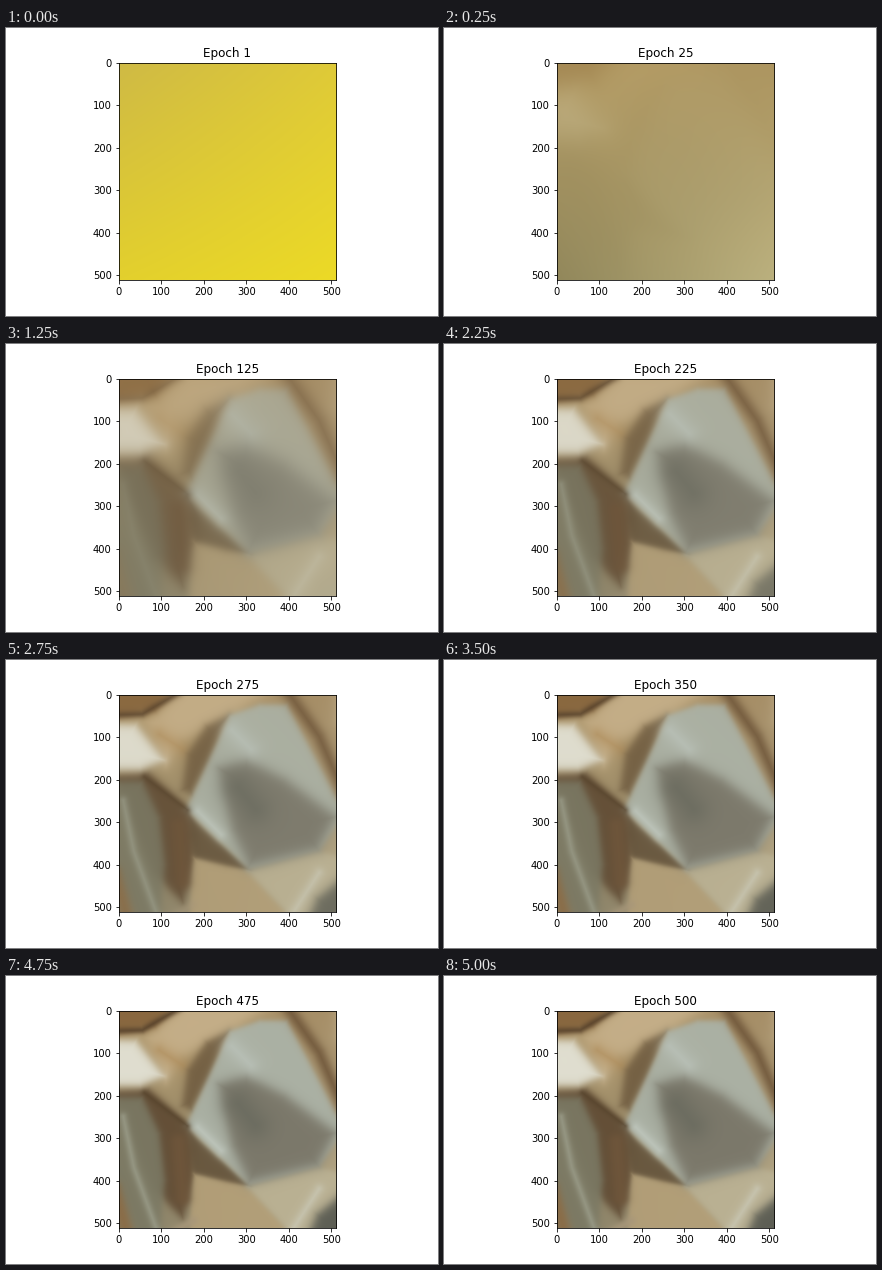
A matplotlib script for the animation above (5.25 s loop, 432x288 px).

```python
import numpy as np
import matplotlib.pyplot as plt
from matplotlib.animation import FuncAnimation
from matplotlib.colors import to_rgb

SIZE = 512
RES = 218
FRAMES = 21

axis = (np.arange(RES) + 0.5) * SIZE / RES
X, Y = np.meshgrid(axis, axis)


def rgb(code):
    return np.array(to_rgb("#" + code))


def gradient(top_left, top_right, bottom_left, bottom_right):
    u, v = X[..., None] / SIZE, Y[..., None] / SIZE
    top = rgb(top_left) * (1 - u) + rgb(top_right) * u
    bottom = rgb(bottom_left) * (1 - u) + rgb(bottom_right) * u
    return top * (1 - v) + bottom * v


def line_distance(points):
    dist = np.full(X.shape, np.inf)
    for (x0, y0), (x1, y1) in zip(points, points[1:]):
        dx, dy = x1 - x0, y1 - y0
        t = np.clip(((X - x0) * dx + (Y - y0) * dy) / (dx * dx + dy * dy), 0, 1)
        dist = np.minimum(dist, np.hypot(X - x0 - t * dx, Y - y0 - t * dy))
    return dist


def inside(points):
    mask = np.zeros(X.shape, bool)
    for (x0, y0), (x1, y1) in zip(points, points[1:]):
        if y0 != y1:
            mask ^= ((y0 > Y) != (y1 > Y)) & (X < x0 + (Y - y0) * (x1 - x0) / (y1 - y0))
    return mask


layers = []


def facet(color, soft, *points, start=20):
    """Soft-edged polygon that begins to appear at epoch start."""
    loop = points + points[:1]
    dist = line_distance(loop)
    layers.append((rgb(color), soft, start, np.where(inside(loop), -dist, dist)))


def streak(color, width, soft, *points, start=60):
    """Soft stroke along a path."""
    layers.append((rgb(color), soft, start, line_distance(points) - width))


YELLOW = gradient("cfba45", "dfca38", "e3d02d", "ecda26")
BASE = gradient("b39a6c", "a58d66", "857c62", "b3aa8c")

# Upper slope and its shadow
facet("c6b08a", 20, (65, 65), (150, -20), (370, -20), (255, 55), (150, 110), (110, 170))
streak("ae8c5a", 8, 22, (95, 95), (150, 130))
facet("715d41", 13, (258, 50), (205, 75), (160, 140), (148, 225), (172, 238), (215, 160))

# Ground
facet("5f4a33", 14, (-20, 190), (70, 185), (170, 275), (180, 330), (178, 390), (150, 490), (80, 420))
facet("65543c", 8, (160, 280), (310, 415), (250, 412), (175, 388))
facet("b39f78", 8, (176, 385), (305, 415), (410, 530), (165, 530))
facet("bbb294", 9, (300, 415), (470, 370), (530, 385), (530, 530), (410, 530))

# Large pale face
facet("abb3a8", 9, (260, 50), (330, 25), (395, 25), (530, 280), (470, 368), (305, 412), (158, 270))
facet("787466", 20, (235, 175), (300, 155), (390, 200), (510, 288), (468, 366), (305, 405), (265, 320))
streak("696a5e", 25, 38, (280, 220), (320, 270), start=80)
streak("c4ccc3", 6, 16, (185, 275), (240, 330), start=40)
streak("bdc5bd", 10, 28, (265, 85), (310, 130), start=40)

# Upper right
streak("6d5438", 12, 15, (393, -10), (470, 100), (525, 225), start=20)
streak("d6c9a8", 10, 25, (530, -20), (530, 60), start=40)

# Left side
facet("86643c", 12, (-30, -30), (150, -30), (85, 40), (-30, 65), start=-40)
streak("543f29", 6, 8, (-20, 50), (55, 47), (140, -3), start=80)
facet("7b7964", 12, (-20, 205), (55, 205), (95, 290), (108, 400), (95, 530), (40, 530), (-20, 400))
streak("9c9e8b", 6, 10, (10, 250), (35, 370), (90, 520), start=100)
streak("6f563b", 16, 14, (140, 310), (150, 440))
streak("8a6b45", 14, 12, (-10, 420), (20, 530), start=100)
streak("a8977a", 8, 10, (110, 530), (175, 495), start=200)
facet("e4e4d8", 14, (-30, 70), (40, 72), (105, 155), (50, 178), (-30, 178), start=0)
streak("56432c", 5, 9, (60, 195), (160, 272))

# Lower right corner
streak("cbcab8", 6, 14, (405, 520), (470, 420))
facet("55574f", 16, (540, 420), (465, 480), (440, 540), (540, 540), start=120)


def picture(epoch):
    """Edges sharpen and facets settle exponentially with training."""
    img = BASE.copy()
    spread = 0.8 + 3 * np.exp(-epoch / 80)
    for color, soft, start, dist in layers:
        strength = 0.93 * (1 - np.exp(-max(epoch - start, 0) / 90))
        edge = 0.5 - 0.5 * np.tanh(dist / (soft * spread))
        img += (color - img) * (strength * edge)[..., None]
    return img + (YELLOW - img) * np.exp((1 - epoch) / 12)


plt.rcParams["font.family"] = "DejaVu Sans"
fig, ax = plt.subplots(figsize=(6, 4), dpi=72, facecolor="white")
fig.subplots_adjust(left=.125, right=.9, bottom=.125, top=.88)
view = ax.imshow(YELLOW, extent=(-.5, 511.5, 511.5, -.5), interpolation="bilinear")
ax.set_xticks(range(0, 501, 100))
ax.set_yticks(range(0, 501, 100))
title = ax.set_title("Epoch 1", fontsize=12)


def update(i):
    epoch = max(1, 25 * i)
    view.set_data(np.clip(picture(epoch), 0, 1))
    title.set_text(f"Epoch {epoch}")
    return view, title


anim = FuncAnimation(fig, update, frames=FRAMES, interval=250, repeat=True, repeat_delay=0)
plt.show()
```
